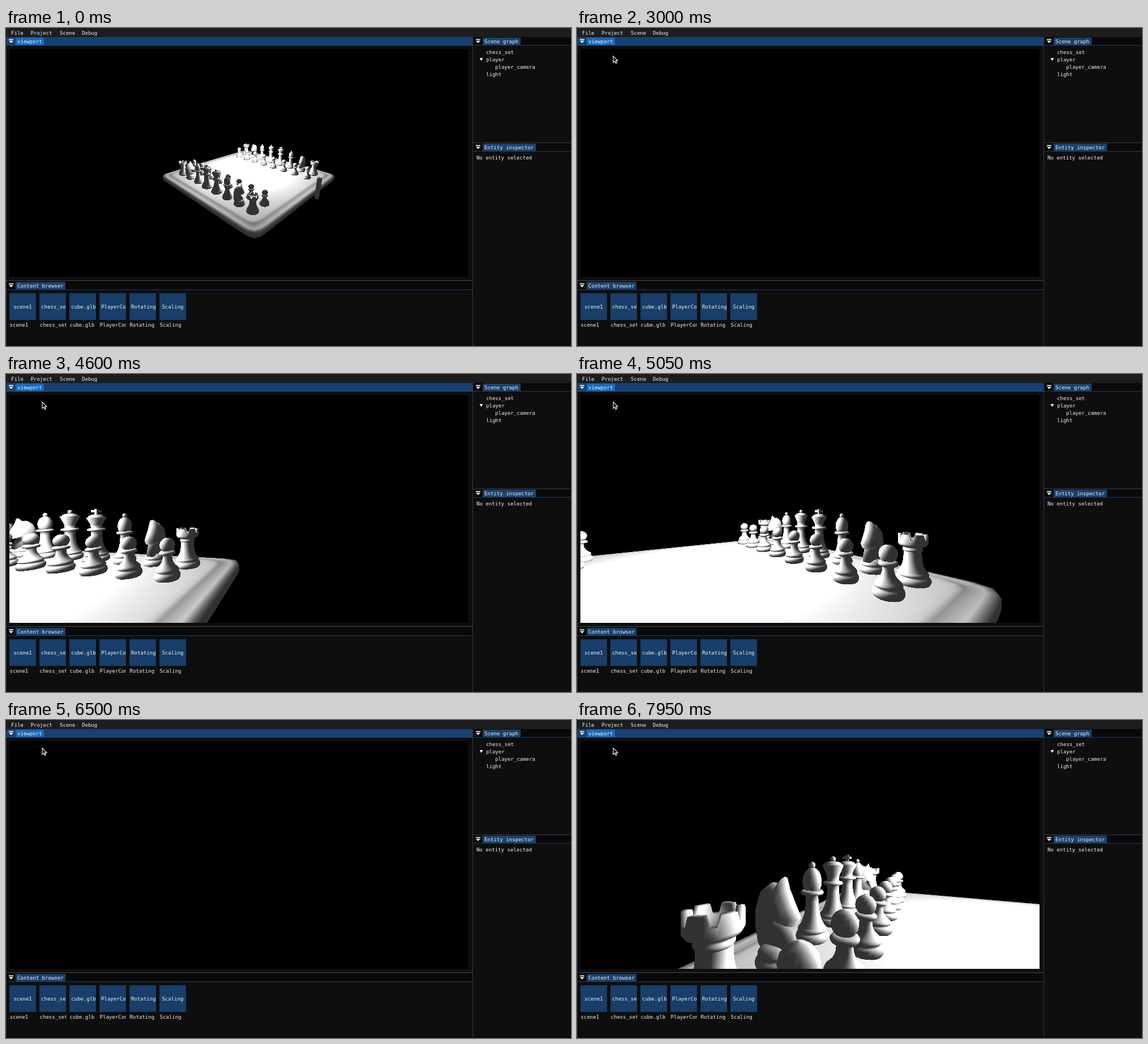
Recreate the animation shown at these times as an HTML page with a canvas. Size 998 by 561 pixels, loop 8 s.

```html
<!DOCTYPE html>
<html lang="en">
<head>
<meta charset="utf-8">
<title>Scene editor</title>
<style>
html, body { margin: 0; width: 100%; height: 100%; overflow: hidden; background: #0e0e0e; }
#view { position: absolute; left: 6px; top: 37px; background: #000; }
svg { position: absolute; left: 0; top: 0; }
text { font: 9.05px "DejaVu Sans Mono", "Noto Sans Mono", monospace; fill: #f2f2f2; white-space: pre; }
</style>
</head>
<body>
<svg id="ui" width="998" height="561" viewBox="0 0 998 561"></svg>
<canvas id="view" width="811" height="402"></canvas>
<svg id="over" width="998" height="561" viewBox="0 0 998 561"></svg>
<script>
const LOOP = 8000, OPEN = 1550, RUN = 2300, WALK = 4825;

// ---------- interface ----------
const rect = (x, y, w, h, fill, more = '') =>
  `<rect x="${x}" y="${y}" width="${w}" height="${h}" fill="${fill}" ${more}/>`;
const text = (x, y, s, more = '') => `<text x="${x}" y="${y + 3}" ${more}>${s}</text>`;
const fold = (x, y) => rect(x - 4, y - 4, 8, 1.6, '#fff') +
  `<path d="M${x - 4} ${y - 1}h8l-4 4z" fill="#fff"/>`;
const panel = (x, y, w, tabW, title, bar = '#090909', line = '#1b3a68', tab = '#1b426c') =>
  rect(x, y, w, 14, bar) + rect(x, y + 14, w, 1, line) +
  rect(x + 17, y + 1, tabW, 13, tab) + fold(x + 9, y + 7.5) + text(x + 20, y + 7.5, title);

let ui = rect(0, 0, 998, 16, '#1d1d1d');
[['File', 9], ['Scene', 95], ['Debug', 134]].forEach(([s, x]) => ui += text(x, 8.5, s));
ui += rect(37, 1, 51, 15, '#1a70cc', 'id="hot"') + text(43.5, 8.5, 'Project');
ui += panel(0, 16, 824, 50, 'viewport') + panel(0, 447, 824, 88, 'Content browser') +
  panel(825, 16, 173, 67, 'Scene graph') + panel(825, 203, 173, 94, 'Entity inspector');
ui += `<g id="focus">${panel(0, 16, 824, 50, 'viewport', '#184070', '#1b5596', '#1c69b8')}</g>`;
ui += rect(0, 445, 824, 1, '#45454a') + rect(825, 202, 173, 1, '#3b3b52') +
  rect(824, 16, 1, 545, '#35384c') + rect(0, 16, 1, 545, '#2b2b33');
ui += text(848, 42.5, 'chess_set') + text(848, 55.5, 'player') + text(864, 69, 'player_camera') +
  text(848, 82, 'light') + '<path d="M836.5 53h6l-3 5z" fill="#fff"/>' +
  text(831, 229, 'No entity selected');
['scene1', 'chess_set', 'cube.glb', 'PlayerController', 'Rotating', 'Scaling'].forEach((s, i) => {
  const x = 6 + 53 * i, label = s.slice(0, 8), inset = Math.max(3, (47 - label.length * 5.45) / 2);
  ui += `<clipPath id="c${i}">${rect(x, 460, 47, 80, '#000')}</clipPath><g clip-path="url(#c${i})">` +
    rect(x, 468, 47, 47, '#183e69') + text(x + inset, 491.5, label) + text(x + .5, 523.5, s) + '</g>';
});
document.getElementById('ui').innerHTML = ui;

document.getElementById('over').innerHTML = '<g id="menu">' +
  rect(37.5, 15.5, 122, 61, '#141414', 'stroke="#34343a"') +
  rect(39, 47.5, 119, 13, '#1a4f8a', 'id="pick"') +
  ['Properties', 'Reload script lib', 'Run', 'Stop'].map((s, i) =>
    text(43, 27.5 + 13.3 * i, s, i === 3 ? 'style="fill:#757575"' : '')).join('') + '</g>' +
  '<path id="mouse" d="M0 0V11.2L2.6 8.9L4.4 12.8L6.3 12L4.5 8.1H8Z" fill="#000" stroke="#fff" stroke-width="1.1"/>';
const [hot, focusBar, menu, pick, mouse] =
  ['hot', 'focus', 'menu', 'pick', 'mouse'].map(id => document.getElementById(id));

// ---------- scene: u along the rows, v across, h up, one unit per square ----------
const verts = [], tris = [], LIGHT = [.4, .6, 3];
const range = (n, f) => Array.from({ length: n }, (_, i) => f(i / (n - 1), i));

function vert(p, n) {
  const d = LIGHT.map((l, i) => l - p[i]);
  const dot = d[0] * n[0] + d[1] * n[1] + d[2] * n[2];
  const lit = Math.max(0, dot / (Math.hypot(...d) * (Math.hypot(...n) || 1)));
  return verts.push([...p, 50 + 310 * lit]) - 1;
}

function skin(loops) {
  for (let i = 1; i < loops.length; i++) {
    const a = loops[i - 1], b = loops[i], n = a.length;
    for (let k = 0; k < n; k++) {
      const m = (k + 1) % n;
      tris.push([a[k], a[m], b[k]], [a[m], b[m], b[k]]);
    }
  }
}

// Turned solid; a high power makes it a rounded square.
function lathe(x, y, prof, segs = 20, pow = 2, cap = h => h) {
  skin(prof.map(([r, h], i) => {
    const [r0, h0] = prof[Math.max(0, i - 1)], [r1, h1] = prof[Math.min(prof.length - 1, i + 1)];
    return Array.from({ length: segs }, (_, k) => {
      const a = k / segs * 2 * Math.PI, c = Math.cos(a), s = Math.sin(a);
      const q = r / (Math.abs(c) ** pow + Math.abs(s) ** pow) ** (1 / pow);
      const gx = Math.sign(c) * Math.abs(c) ** (pow - 1), gy = Math.sign(s) * Math.abs(s) ** (pow - 1);
      const g = Math.hypot(gx, gy);
      return vert([x + q * c, y + q * s, cap(h, k)], [(h1 - h0) * gx / g, (h1 - h0) * gy / g, r0 - r1]);
    });
  }));
}

function box(mid, size) {
  for (let a = 0; a < 3; a++) for (const s of [-1, 1]) {
    const n = [0, 0, 0], b = (a + 1) % 3, c = (a + 2) % 3;
    n[a] = s;
    const q = [[-1, -1], [1, -1], [1, 1], [-1, 1]].map(([i, j]) => {
      const p = [...mid];
      p[a] += s * size[a] / 2;
      p[b] += i * size[b] / 2;
      p[c] += j * size[c] / 2;
      return vert(p, n);
    });
    tris.push([q[0], q[1], q[2]], [q[0], q[2], q[3]]);
  }
}

// Profile parts as [radius, height] points.
const ball = (r, mid, tall = r, from = -1.1) => range(8, k => {
  const a = from + (Math.PI / 2 - from) * k;
  return [r * Math.cos(a), mid + tall * Math.sin(a)];
});
const bulge = (r, low, high) => range(5, k => [r * (.9 + .1 * Math.sin(Math.PI * k)), low + (high - low) * k]);
const foot = r => [...bulge(r, 0, .15), ...bulge(r * .88, .16, .25)];
const stem = (r, neck, h, collar) => [...foot(r),
  ...range(6, k => [neck + (r * .75 - neck) * (1 - k) ** 3, .26 + (h - .26) * k]),
  ...bulge(collar, h, h + .07), [neck, h + .09]];

const HORSE = [[-.3, .2], [-.37, .5], [-.36, .8], [-.27, 1.06], [-.1, 1.18], [.03, 1.15], [.12, 1.27], [.17, 1.1],
  [.28, .88], [.37, .7], [.3, .6], [.17, .66], [.04, .68], [.04, .55], [.2, .4], [.27, .2]];

const make = {
  P: (x, y) => lathe(x, y, [...stem(.29, .1, .55, .18), ...ball(.168, .76)]),
  R: (x, y) => lathe(x, y, [...stem(.35, .175, .68, .2), [.26, .8], [.29, .85], [.29, 1.04], [.21, 1.04], [.2, .92], [0, .92]],
    48, 2, (h, k) => k % 8 < 3 ? Math.min(h, .93) : h),
  N(x, y) {
    lathe(x, y, [...foot(.33), [.2, .32], [0, .34]]);
    const face = -Math.sign(y), a0 = -.12, h0 = .75;
    skin(range(9, k => {
      const turn = (k - .5) * Math.PI, grow = Math.cos(turn) ** .6, side = Math.sin(turn);
      return HORSE.map(([a, h]) => {
        const da = a - a0, dh = h - h0, len = Math.hypot(da, dh), out = Math.cos(turn) / len;
        return vert([x + .19 * side, y + face * (a0 + da * grow), h0 + dh * grow],
          [side, face * da * out, dh * out]);
      });
    }));
  },
  B: (x, y) => lathe(x, y, [...stem(.31, .12, .84, .22), ...ball(.185, 1.08, .26), ...ball(.065, 1.38)]),
  Q: (x, y) => lathe(x, y, [...stem(.35, .135, .89, .23), [.14, 1.08], [.25, 1.34],
    ...ball(.2, 1.36, .07, 0), ...ball(.065, 1.48)]),
  K(x, y) {
    lathe(x, y, [...stem(.36, .145, .91, .24), [.15, 1.1], [.26, 1.31], ...ball(.21, 1.33, .08, 0)]);
    box([x, y, 1.48], [.07, .07, .19]);
    box([x, y, 1.5], [.19, .19, .07]);
  }
};

const rim = [[4.72, -.4], [4.8, -.32], [4.8, -.13], [4.75, -.06], [4.6, -.05], [4.42, -.05], [4.32, -.01], [4.2, 0]];
lathe(0, 0, [...rim, ...range(9, k => [4.05 * (1 - k), 0])], 128, 24);
[...'RNBQKBNR'].forEach((kind, i) => {
  const u = i - 3.5;
  make[kind](u, -3.5);
  make[kind](-u, 3.5);
  make.P(u, -2.5);
  make.P(u, 2.5);
});
const START = { u: -5.97, v: -1.55, h: 1.575 };
const gameTris = tris.length;
box([START.u, START.v, START.h], [.17, .17, 1.1]);

// ---------- renderer ----------
const W = 811, H = 402, FOCAL = 348, NEAR = .12;
const ctx = document.getElementById('view').getContext('2d');
const img = ctx.createImageData(W, H), pix = new Uint32Array(img.data.buffer);
const depth = new Float32Array(W * H);

const project = ([x, y, z, s]) => [W / 2 + FOCAL * x / z, H / 2 + FOCAL * y / z, 1 / z, s / z];

function fill(a, b, c) {
  const x1 = b[0] - a[0], y1 = b[1] - a[1], x2 = c[0] - a[0], y2 = c[1] - a[1];
  const area = x1 * y2 - x2 * y1;
  if (Math.abs(area) < 1e-6) return;
  const slope = i => [((b[i] - a[i]) * y2 - (c[i] - a[i]) * y1) / area,
    ((c[i] - a[i]) * x1 - (b[i] - a[i]) * x2) / area];
  const top = Math.max(0, Math.ceil(Math.min(a[1], b[1], c[1]) - .5));
  const end = Math.min(H - 1, Math.floor(Math.max(a[1], b[1], c[1]) - .5));
  if (top > end) return;
  const [zx, zy] = slope(2), [sx, sy] = slope(3), edges = [[a, b], [b, c], [c, a]];
  for (let y = top; y <= end; y++) {
    const yc = y + .5;
    let l = Infinity, r = -Infinity;
    for (const [p, q] of edges) {
      if ((p[1] <= yc) === (q[1] <= yc)) continue;
      const x = p[0] + (yc - p[1]) * (q[0] - p[0]) / (q[1] - p[1]);
      if (x < l) l = x;
      if (x > r) r = x;
    }
    const from = Math.max(0, Math.ceil(l - .5)), to = Math.min(W - 1, Math.ceil(r - .5) - 1);
    let z = a[2] + (from + .5 - a[0]) * zx + (yc - a[1]) * zy;
    let s = a[3] + (from + .5 - a[0]) * sx + (yc - a[1]) * sy;
    for (let x = from, i = y * W + from; x <= to; x++, i++, z += zx, s += sx) {
      if (z <= depth[i]) continue;
      depth[i] = z;
      const v = Math.max(40, Math.min(255, s / z)) | 0;
      pix[i] = 0xff000000 | v * 0x10101;
    }
  }
}

function render(cam, count) {
  const cy = Math.cos(cam.yaw), sy = Math.sin(cam.yaw), cp = Math.cos(cam.pitch), sp = Math.sin(cam.pitch);
  pix.fill(0xff000000);
  depth.fill(0);
  const eye = verts.map(([u, v, h, s]) => {
    const du = u - cam.u, dv = v - cam.v, dh = h - cam.h, d = du * cy + dv * sy;
    return [dv * cy - du * sy, -dh * cp - d * sp, d * cp - dh * sp, s];
  });
  const flat = eye.map(e => e[2] > NEAR ? project(e) : null);
  for (let i = 0; i < count; i++) {
    const t = tris[i], f = t.map(k => flat[k]);
    if (f[0] && f[1] && f[2]) { fill(...f); continue; }
    if (!f[0] && !f[1] && !f[2]) continue;
    const poly = [];
    for (let k = 0; k < 3; k++) {
      const p = eye[t[k]], q = eye[t[(k + 1) % 3]];
      if (p[2] > NEAR) poly.push(project(p));
      if ((p[2] > NEAR) !== (q[2] > NEAR)) {
        const m = (NEAR + 1e-4 - p[2]) / (q[2] - p[2]);
        poly.push(project(p.map((n, j) => n + (q[j] - n) * m)));
      }
    }
    for (let k = 2; k < poly.length; k++) fill(poly[0], poly[k - 1], poly[k]);
  }
  ctx.putImageData(img, 0, 0);
}

// ---------- motion ----------
const RAD = Math.PI / 180, SPEED = .004;
// time, heading in degrees
const TURN = [[3955, 135], [5050, 39.2], [5200, 10], [5350, 5], [5500, 13], [5570, 13], [6555, 180], [7950, 330.3], [8000, 335]];
// time, x, y of the pointer tip
const POINTER = [[1200, 160, -14], [1480, 69.5, 7.5], [1850, 69.5, 7.5], [2120, 64, 49.5], [8000, 64, 49.5]];

function at(table, t) {
  if (t <= table[0][0]) return table[0].slice(1);
  const i = table.findIndex(r => r[0] >= t), a = table[i - 1], b = table[i];
  const k = (t - a[0]) / (b[0] - a[0]);
  return a.slice(1).map((n, j) => n + (b[j + 1] - n) * k);
}
const heading = t => at(TURN, t)[0] * RAD;

// The player always walks straight ahead, so the place follows from the headings.
function player(t) {
  let { u, v, h } = START;
  const step = 5;
  for (let s = WALK; s < t; s += step) {
    const a = heading(s + step / 2);
    u += Math.cos(a) * SPEED * step;
    v += Math.sin(a) * SPEED * step;
  }
  return { u, v, h, yaw: heading(t), pitch: 0 };
}

const EDITOR = { u: -9.29, v: -10.31, h: 6.05, yaw: 45 * RAD, pitch: 20.3 * RAD };
const show = (el, on) => { el.style.display = on ? '' : 'none'; };
let last = '';

function draw(now) {
  const t = Math.floor(now % LOOP / 50) * 50, playing = t >= RUN;
  const [mx, my] = at(POINTER, t), open = t >= OPEN && !playing;
  mouse.setAttribute('transform', `translate(${mx} ${my})`);
  show(mouse, t > 1200);
  show(menu, open);
  show(hot, open || (t >= 1450 && t < OPEN));
  show(focusBar, !open);
  show(pick, my > 47.5);
  const cam = playing ? player(t) : EDITOR, key = JSON.stringify(cam);
  if (key === last) return;
  last = key;
  render(cam, playing ? gameTris : tris.length);
}

const begin = performance.now();
function tick() {
  draw(performance.now() - begin);
  requestAnimationFrame(tick);
}
tick();
</script>
</body>
</html>
```
